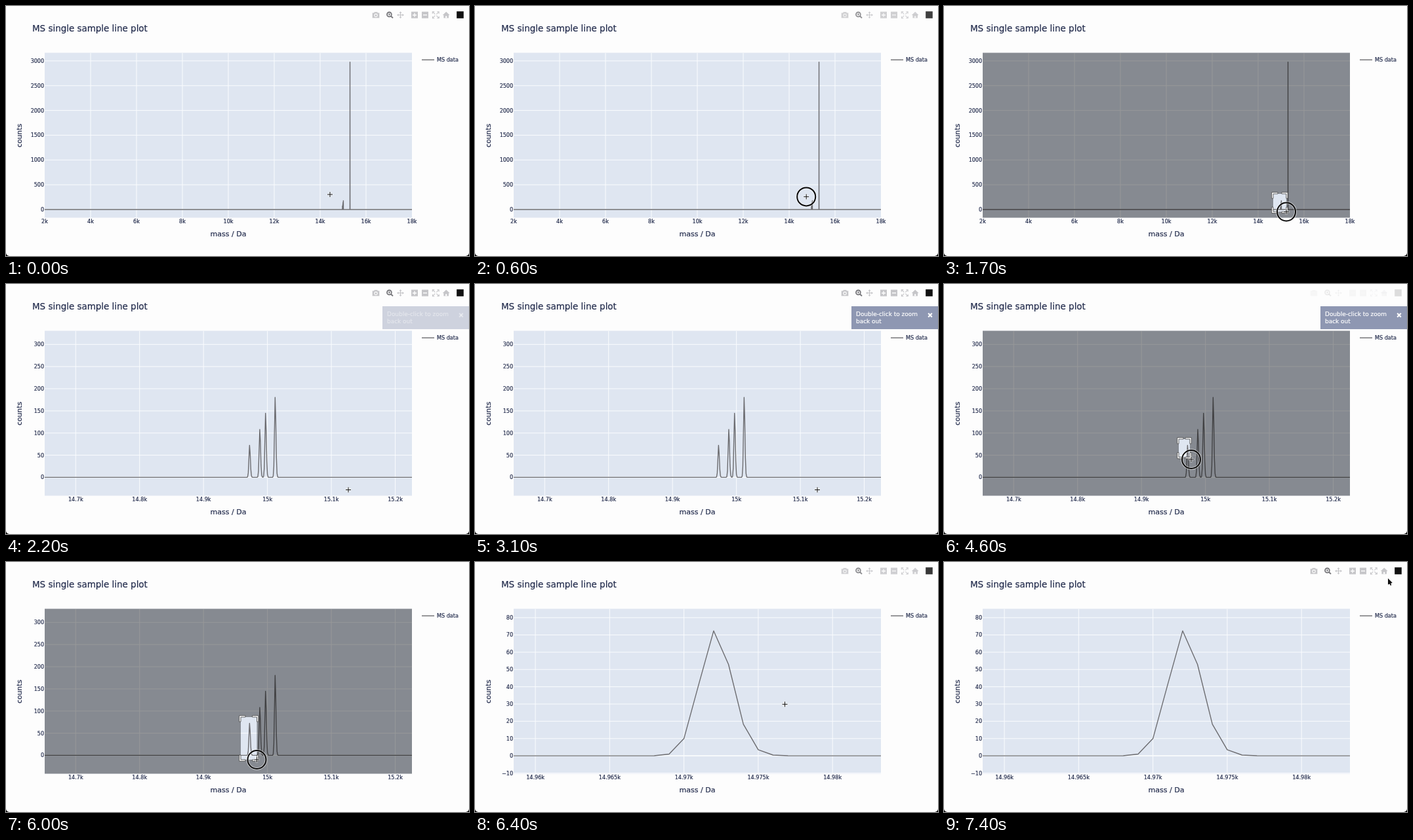
Animation, 706 px wide and 382 px high, one loop 8300 ms. Source, as an HTML page with a canvas:

```html
<!DOCTYPE html>
<html lang="en">
<head>
<meta charset="utf-8">
<title>Line plot zoom</title>
<style>
html, body { margin: 0; width: 100%; height: 100%; overflow: hidden; background: #000; }
canvas { display: block; }
</style>
</head>
<body>
<canvas id="stage" width="706" height="382"></canvas>
<script>
const g = document.getElementById('stage').getContext('2d');
const LOOP = 8300, STEP = 100;
const SANS = 'Verdana, "DejaVu Sans", sans-serif';
const ARIAL = 'Arial, "Liberation Sans", sans-serif';
const PAGE = '#fdfdfd', INK = '#222b4c', LINE = '#6c6c70', PALE = '#c6c6c9', GRID = '#fafcfe';
const plot = { left: 59, right: 619, top: 71.6, bottom: 323.6 };

// Spectrum: bell-shaped peaks with a slight tail towards higher mass
const BASE = 15301;
const peaks = [[14972, 73], [14988, 109], [14997, 146], [15012, 182], [BASE, 3000]];
const bell = d => Math.exp(-((d - .14) ** 2) / (2.1 + .2 * Math.max(d, 1)));
const counts = m => peaks.reduce((sum, [mass, top]) => sum + top * bell(m - mass), 0);
const data = Array.from({ length: 16001 }, (_, i) => [2000 + i, counts(2000 + i)]);

const views = [
  { x: [2000, 18000], y: [-166, 3162], dx: 2000, dy: 500 },
  { x: [14651.5, 15226.1], y: [-41.7, 330.7], dx: 100, dy: 50 },
  { x: [14958.54, 14983.26], y: [-10.4, 85.1], dx: 5, dy: 10 }
];
const drags = [{ from: 500, to: 1900 }, { from: 4300, to: 6200 }];

// Pointer moves: start time, end time, destination
const moves = [
  [0, 300, 502, 287], [500, 1700, 522, 314.5], [3300, 3900, 364, 251], [3900, 4100, 358, 237],
  [4300, 4600, 377, 268], [4600, 5800, 382.5, 302], [6200, 7400, 677, 25]
];

const clamp = v => Math.max(0, Math.min(1, v));
const easeOut = u => 1 - (1 - u) ** 2;
const easeInOut = u => u < .5 ? 4 * u ** 3 : 1 - 4 * (1 - u) ** 3;

function pointer(t) {
  let x = 494, y = 288;
  for (const [from, to, toX, toY] of moves) {
    const u = easeOut(clamp((t - from) / (to - from)));
    x += (toX - x) * u;
    y += (toY - y) * u;
  }
  return [x, y];
}

function text(s, x, y, size, align = 'left', color = INK, family = SANS) {
  g.font = `${size}px ${family}`;
  g.textAlign = align;
  g.fillStyle = g.strokeStyle = color;
  g.lineWidth = .2;
  g.fillText(s, x, y);
  g.strokeText(s, x, y);
}

function outline(points) {
  g.beginPath();
  points.forEach(p => g.lineTo(...p));
}

function trace(points, color, width = 1) {
  outline(points);
  g.strokeStyle = color;
  g.lineWidth = width;
  g.stroke();
}

function solid(points, color) {
  outline(points);
  g.fillStyle = color;
  g.fill();
}

function ring(x, y, r, color, width) {
  g.beginPath();
  g.arc(x, y, r, 0, 7);
  g.strokeStyle = color;
  g.lineWidth = width;
  g.stroke();
}

function cross(x, y, r, color, width) {
  trace([[x - r, y], [x + r, y]], color, width);
  trace([[x, y - r], [x, y + r]], color, width);
}

function box(x, y, w, h, color) {
  g.fillStyle = color;
  g.fillRect(x, y, w, h);
}

// Square of half-size r around a centre
const square = (x, y, r, color) => box(x - r, y - r, 2 * r, 2 * r, color);

function place(x, y, angle, paint) {
  g.save();
  g.translate(x, y);
  g.rotate(angle);
  paint();
  g.restore();
}

function quarters(x, y, paint) {
  for (let i = 0; i < 4; i++) place(x, y, i * Math.PI / 2, paint);
}

function ticks([a, b], step) {
  const list = [];
  for (let v = Math.ceil(a / step) * step; v <= b; v += step) list.push(v);
  return list;
}

function scales({ x: [x0, x1], y: [y0, y1] }) {
  return [
    m => plot.left + (m - x0) / (x1 - x0) * (plot.right - plot.left),
    c => plot.bottom - (c - y0) / (y1 - y0) * (plot.bottom - plot.top)
  ];
}

function plotRect() {
  g.beginPath();
  g.rect(plot.left, plot.top, plot.right - plot.left, plot.bottom - plot.top);
}

function drawPlot(view) {
  const [px, py] = scales(view), [x0, x1] = view.x;
  const xs = ticks(view.x, view.dx), ys = ticks(view.y, view.dy);
  g.save();
  plotRect();
  g.fillStyle = '#dfe6f1';
  g.fill();
  g.clip();
  for (const m of xs) if (m > x0 && m < x1) trace([[px(m), plot.top], [px(m), plot.bottom]], GRID);
  for (const c of ys) trace([[plot.left, py(c)], [plot.right, py(c)]], GRID, c ? 1 : 1.6);
  g.lineJoin = 'round';
  const shown = data.filter(([m]) => m > x0 - 2 && m < x1 + 2);
  trace(shown.map(([m, c]) => [px(m), py(c)]), LINE, 1.4);
  g.restore();
  for (const m of xs) text(m / 1000 + 'k', px(m), 332.3, 8.1, 'center');
  for (const c of ys) text(String(c).replace('-', '\u2212'), 58, py(c) + 3, 8, 'right');
}

function drawLabels() {
  text('MS single sample line plot', 40, 39, 13.45);
  text('mass / Da', 339, 352, 11, 'center');
  place(24, 198, -Math.PI / 2, () => text('counts', 0, 0, 10.8, 'center'));
  trace([[634, 82.3], [653, 82.3]], LINE, 1.4);
  text('MS data', 657, 85.4, 8.1);
}

function drawToolbar(alpha) {
  const y = 13.7;
  g.save();
  g.globalAlpha = alpha;
  // camera
  box(558.7, 10.5, 10.6, 7.8, PALE);
  box(561.5, 9.2, 5, 2, PALE);
  ring(564, 14.3, 2.2, PAGE, 1.1);
  // magnifier
  ring(584.4, 12.9, 3.4, '#77777b', 1.8);
  cross(584.4, 12.9, 1.6, '#77777b', 1);
  trace([[587, 15.5], [590, 18.4]], '#77777b', 2);
  // pan
  cross(601.5, y, 4.5, PALE, 1.2);
  quarters(601.5, y, () => solid([[5.4, 0], [3, -2], [3, 2]], PALE));
  // zoom in and out
  for (const x of [623, 639]) {
    square(x, y, 5, PALE);
    trace([[x - 3, y], [x + 3, y]], PAGE, 1.4);
  }
  cross(623, y, 3, PAGE, 1.4);
  // autoscale
  quarters(655.3, y, () => {
    trace([[1, 1], [4.5, 4.5]], PALE, 1.1);
    trace([[2, 4.8], [5, 4.8], [5, 2]], PALE, 1.1);
  });
  // home
  solid([[665.8, 14], [671.2, 8.8], [676.6, 14]], PALE);
  box(667.4, 13, 7.6, 5.4, PALE);
  box(670.1, 15.3, 2.2, 3.1, PAGE);
  square(692.5, 13.5, 5.3, '#111');
  g.restore();
}

function drawNotice(alpha) {
  g.save();
  g.globalAlpha = alpha;
  box(574, 34, 132, 35, '#8e97b2');
  text('Double-click to zoom', 581, 49.3, 8.95, 'left', '#fff');
  text('back out', 581, 60.3, 8.95, 'left', '#fff');
  place(694, 47.6, Math.PI / 4, () => cross(0, 0, 4, '#fff', 2));
  g.restore();
}

function drawHover(mass) {
  const [px, py] = scales(views[1]), c = counts(mass);
  place(px(mass) - .5, py(c) - .3, 0, () => {
    solid([[0, 0], [5, -4], [5, 4]], '#717172');
    box(5, -18.5, 92, 37, '#717172');
    g.strokeStyle = '#5a5a5b';
    g.lineWidth = .9;
    g.strokeRect(5, -18.5, 92, 37);
    [`mass: ${mass} Da`, `relative mass: ${mass - BASE} Da`, `counts: ${c.toFixed(1)}`]
      .forEach((s, i) => text(s, 7, i * 11.5 - 8.4, 8.75, 'left', '#303032', ARIAL));
  });
}

function drawSelection(t, { from }) {
  // The rectangle trails the pointer by one step
  const [x0, y0] = pointer(from), [x1, y1] = pointer(Math.max(from, t - STEP));
  const w = x1 - x0, h = y1 - y0, alpha = clamp((t - from - 50) / 250);
  if (w < 2 || h < 2) return;
  plotRect();
  g.rect(x0, y0, w, h);
  g.fillStyle = `rgba(0,0,0,${.4 * alpha})`;
  g.fill('evenodd');
  const arm = Math.min(w, h, 14) / 2, d = 2.3;
  g.save();
  g.globalAlpha = alpha;
  for (const [x, sx] of [[x0, 1], [x1, -1]]) for (const [y, sy] of [[y0, 1], [y1, -1]]) {
    const corner = [[-d, arm], [0, arm], [0, 0], [arm, 0], [arm, -d], [-d, -d], [-d, arm]]
      .map(([a, b]) => [x + a * sx, y + b * sy]);
    solid(corner, '#fff');
    trace(corner, '#444', .8);
  }
  g.restore();
}

function drawPointer(x, y, pressed) {
  if (x > plot.right || y < plot.top) {
    place(x, y, 0, () => {
      solid([[0, 0], [0, 9.6], [6.7, 6.8]], '#111');
      trace([[2.5, 6], [4.5, 10.6]], '#111', 1.8);
    });
    return;
  }
  cross(x, y, 4.5, 'rgba(255,255,255,.7)', 2.6);
  cross(x, y, 4, '#111', 1);
  if (!pressed) return;
  ring(x, y, 14, 'rgba(255,255,255,.5)', 4);
  ring(x, y, 14, '#0a0a0a', 2);
}

function draw(t) {
  const zoomed = drags.filter(d => t >= d.to).length;
  const drag = drags.find(d => t >= d.from && t < d.to);
  const released = zoomed ? drags[zoomed - 1].to : -LOOP;
  const notice = easeInOut(clamp((t - 1870) / 700)) - easeInOut(clamp((t - 4800) / 650));

  box(0, 0, 706, 382, '#000');
  g.beginPath();
  g.roundRect(0, 0, 706, 382, [0, 0, 5, 5]);
  g.fillStyle = PAGE;
  g.fill();
  drawPlot(views[zoomed]);
  drawLabels();
  drawToolbar(clamp(drag ? 1 - (t - drag.from - 40) / 300 : (t - released + 50) / 300));
  if (notice > 0) drawNotice(notice);
  if (t >= 3700 && t < 4300) drawHover(t < 4000 ? 14973 : 14972);
  if (drag) drawSelection(t, drag);
  drawPointer(...pointer(t), drag);
}

const start = performance.now();
function tick() {
  const t = (performance.now() - start) % LOOP;
  draw(Math.floor(t / STEP) * STEP);
  requestAnimationFrame(tick);
}
tick();
</script>
</body>
</html>
```
